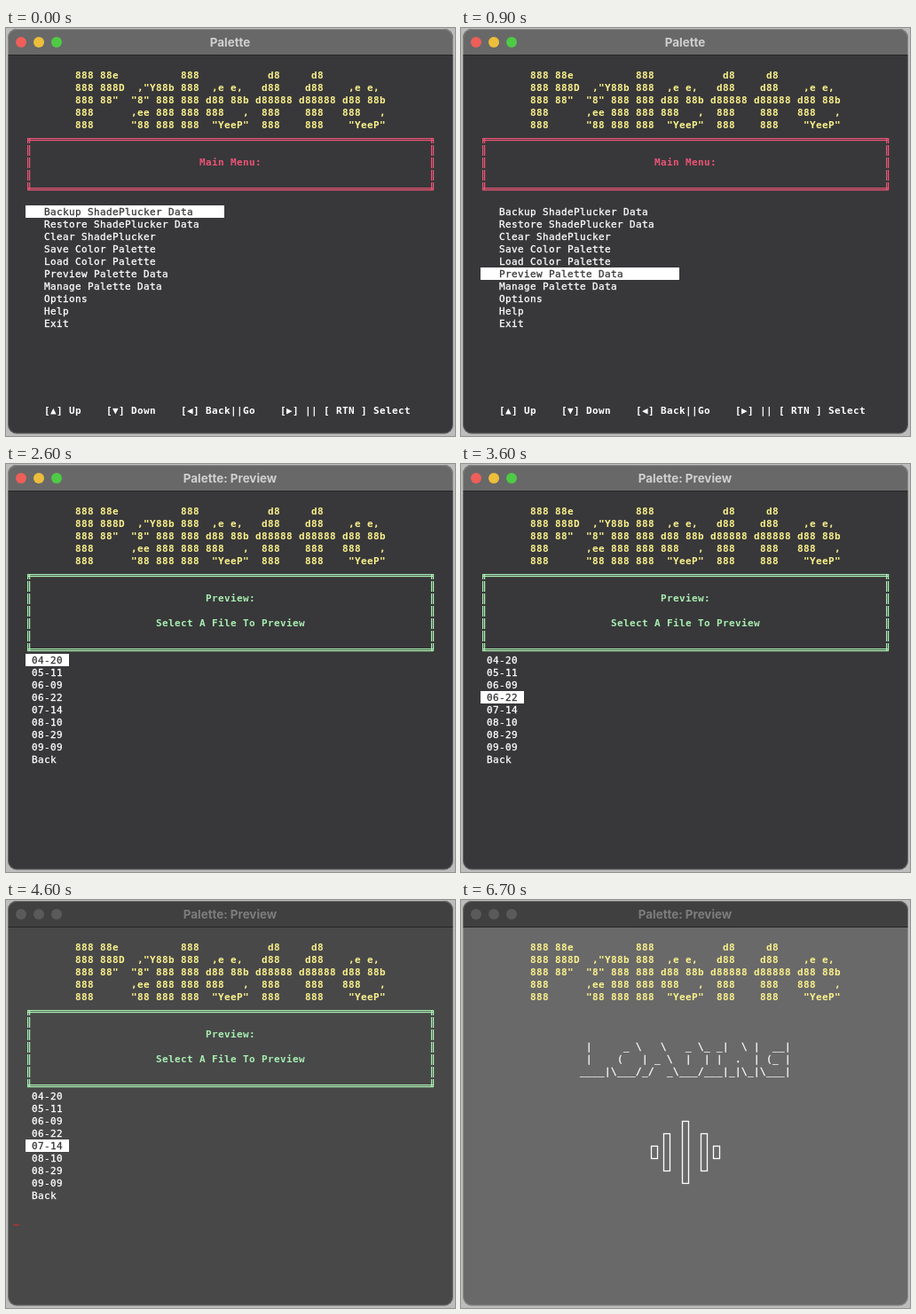
Animation of 506 by 460 pixels, one loop 6.8 s. Source, as an HTML page with a canvas:

```html
<!DOCTYPE html>
<html lang="en">
<head>
<meta charset="utf-8">
<title>Palette</title>
<style>
html, body { margin: 0; width: 100%; height: 100%; overflow: hidden; background: #bdbdbd; }
canvas { display: block; }
</style>
</head>
<body>
<canvas id="stage" width="506" height="460"></canvas>
<script>
const ctx = document.getElementById('stage').getContext('2d');
const LOOP = 6800, STEP = 100;
const CELL_W = 7, CELL_H = 14, LEFT = 8, TOP = 32;
const YELLOW = '#fdf38c', PINK = '#ee5476', GREEN = '#a9f0b2', WHITE = '#fff', DARK = '#38383a';

const LOGO = [
  '888 88e          888           d8     d8',
  '888 888D  ,"Y88b 888  ,e e,   d88    d88    ,e e,',
  '888 88"  "8" 888 888 d88 88b d88888 d88888 d88 88b',
  '888      ,ee 888 888 888   ,  888    888   888   ,',
  '888      "88 888 888  "YeeP"  888    888    "YeeP"'
];
const LOADING = [
  ' |     _ \\   \\   _ \\_ _|  \\ |  __|',
  ' |    (   | _ \\  |  | |  .  | (_ |',
  '____|\\___/_/  _\\___/___|_|\\_|\\___|'
];
const MENU = [
  'Backup ShadePlucker Data', 'Restore ShadePlucker Data', 'Clear ShadePlucker',
  'Save Color Palette', 'Load Color Palette', 'Preview Palette Data',
  'Manage Palette Data', 'Options', 'Help', 'Exit'
];
const FILES = ['04-20', '05-11', '06-09', '06-22', '07-14', '08-10', '08-29', '09-09', 'Back'];
const FOOTER = '[▲] Up    [▼] Down    [◀] Back||Go    [▶] || [ RTN ] Select';

// Key presses that move the highlight down one line
const MENU_KEYS = [100, 200, 400, 500, 800];
const FILE_KEYS = [3200, 3300, 3500, 4000];
const pressed = (keys, t) => keys.filter(k => t >= k).length;

const cellX = col => LEFT + col * CELL_W;
const cellY = row => TOP + row * CELL_H;

function print(text, col, row, color, bold) {
  ctx.font = `${bold ? 'bold ' : ''}11px "DejaVu Sans Mono", monospace`;
  ctx.textAlign = 'left';
  ctx.fillStyle = ctx.strokeStyle = color;
  ctx.lineWidth = 0.3;
  [...text].forEach((ch, i) => {
    if (ch === ' ') return;
    const x = cellX(col + i), y = cellY(row) + 11;
    ctx.fillText(ch, x, y);
    if (!bold) ctx.strokeText(ch, x, y);
  });
}

function printLines(lines, col, row, color, bold) {
  lines.forEach((line, i) => print(line, col, row + i, color, bold));
}

// Double frame whose sides break between text rows
function printBox(rows, color) {
  const top = cellY(6) + 8, bottom = cellY(5 + rows) + 8;
  ctx.fillStyle = color;
  for (const d of [0, 2]) {
    ctx.fillRect(24, top + d, 458, 1.2);
    ctx.fillRect(24, bottom + d, 458, 1.2);
    for (const x of [24, 479]) {
      for (let r = 6; r < 6 + rows; r++) {
        const y0 = Math.max(top, cellY(r) + 2);
        const y1 = Math.min(bottom + 2, cellY(r + 1));
        ctx.fillRect(x + d, y0, 1.2, y1 - y0);
      }
    }
  }
}

function printList(items, selected, col, row, width) {
  ctx.fillStyle = WHITE;
  ctx.fillRect(cellX(2), cellY(row + selected), width * CELL_W, CELL_H);
  items.forEach((item, i) => print(item, col, row + i, i === selected ? DARK : WHITE));
}

function drawWindow(title, active, shade) {
  ctx.fillStyle = '#bdbdbd';
  ctx.fillRect(0, 0, 506, 460);
  ctx.save();
  ctx.beginPath();
  ctx.roundRect(2, 1, 502, 456.5, 10);
  ctx.clip();
  const v = Math.round(56 + 49 * shade);
  ctx.fillStyle = `rgb(${v},${v},${v + Math.round(2 - 2 * shade)})`;
  ctx.fillRect(0, 0, 506, 460);
  ctx.fillStyle = active ? '#686868' : '#404040';
  ctx.fillRect(0, 0, 506, 30);
  ctx.fillStyle = '#262627';
  ctx.fillRect(0, 30, 506, 1);
  ctx.restore();

  ctx.strokeStyle = 'rgba(255,255,255,.22)';
  ctx.lineWidth = 1;
  ctx.beginPath();
  ctx.roundRect(2.5, 1.5, 501, 455.5, 10);
  ctx.stroke();

  ['#ee5f59', '#ecbe3c', '#4fca46'].forEach((color, i) => {
    ctx.fillStyle = active ? color : '#5a5a5a';
    ctx.beginPath();
    ctx.arc(17 + 20 * i, 16, 6, 0, 7);
    ctx.fill();
  });
  ctx.font = 'bold 13.4px Inter, sans-serif';
  ctx.textAlign = 'center';
  ctx.fillStyle = active ? '#d0d0d0' : '#7d7d7d';
  ctx.fillText(title, 252.5, 20.5);
}

function drawMenu(t) {
  printBox(5, PINK);
  print('Main Menu:', 30, 8, PINK, true);
  printList(MENU, pressed(MENU_KEYS, t), 5, 12, 32);
  print(FOOTER, 5, 28, WHITE, true);
}

function drawFiles(t) {
  printBox(7, GREEN);
  print('Preview:', 31, 8, GREEN, true);
  print('Select A File To Preview', 23, 10, GREEN, true);
  printList(FILES, pressed(FILE_KEYS, t), 3, 13, 7);
  if (t >= 4300) {
    ctx.fillStyle = '#d22b2b';
    ctx.fillRect(LEFT, 366, CELL_W, 1);
  }
}

// Five bars pulse with a wave running from the sides to the middle
function drawLoading(t) {
  printLines(LOADING, 18, 9, WHITE);
  const n = Math.floor((t - 5100) / 120) + 8;
  ctx.strokeStyle = WHITE;
  ctx.lineWidth = 1.3;
  [29, 31, 34, 37, 39].forEach((col, i) => {
    const phase = (n + 1 + Math.abs(i - 2)) % 4;
    const level = 3 - Math.abs(2 - phase);
    const half = CELL_H * (level - 0.5);
    ctx.strokeRect(cellX(col) + 3.5, 284.5 - half, CELL_W, 2 * half);
  });
}

function draw(now) {
  const t = Math.floor(now % LOOP / STEP) * STEP;
  const shade = Math.min(1, Math.max(0, (t - 4500) / 300));
  drawWindow(t < 1300 ? 'Palette' : 'Palette: Preview', t < 4400, shade);
  printLines(LOGO, 10, 1, YELLOW, true);
  if (t < 1300) drawMenu(t);
  else if (t >= 4800) drawLoading(t);
  else if (t >= 2400) drawFiles(t);
}

const start = performance.now();
(function tick() {
  draw(performance.now() - start);
  requestAnimationFrame(tick);
})();
</script>
</body>
</html>
```
